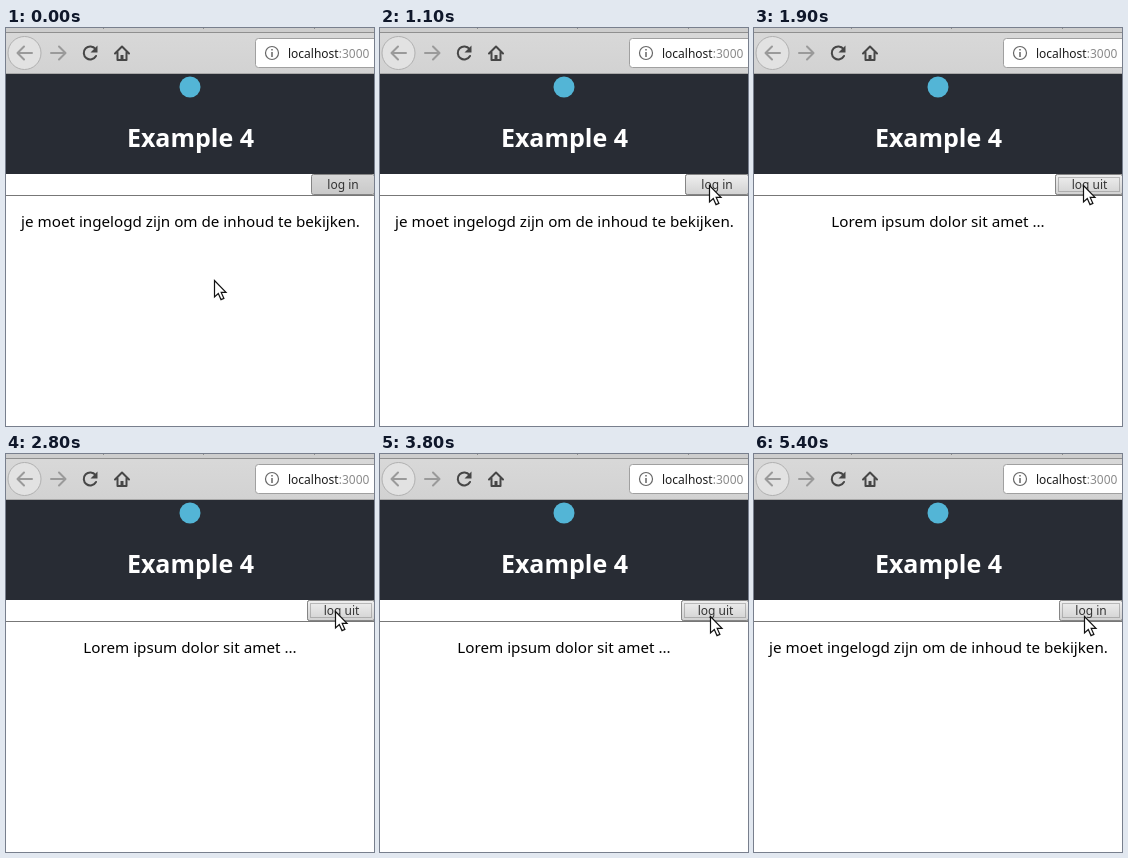
An HTML page for the animation above (5500 ms loop, 368 px wide and 398 px high).

```html
<!DOCTYPE html>
<html lang="nl">
<head>
<meta charset="utf-8">
<title>Example 4</title>
<style>
  html, body { margin: 0; width: 100%; height: 100%; overflow: hidden; background: #fff; }
  svg { display: block; width: 368px; height: 398px; font-family: "Noto Sans", "Open Sans", sans-serif; }
  .small { font-size: 12px; }
  .body { font-size: 15.2px; }
  .title { font-size: 25px; font-weight: 700; }
  .mid { text-anchor: middle; }
  .icon { fill: none; stroke: #464646; stroke-width: 2; stroke-linecap: round; stroke-linejoin: round; }
  .icon.off { stroke: #9a9a9a; }
  .edge { fill: url(#idle); stroke: #858585; }
  .hover { fill: url(#lit); stroke: #858585; }
  .ring { fill: none; stroke: #858585; stroke-dasharray: 1 1; }

  .pointer, .in, .out, .hover, .ring { animation: 5.5s step-end infinite; }
  .pointer { animation-name: move; }
  .in { animation-name: logged-out; }
  .out { animation-name: logged-in; }
  .hover { animation-name: hover; }
  .ring { animation-name: focus; }

  @keyframes move {
    0% { transform: translate(208px, 252px); }
    3.63% { transform: translate(217px, 245px); }
    5.45% { transform: translate(247px, 221px); }
    7.27% { transform: translate(289px, 187px); }
    9.09% { transform: translate(320px, 163px); }
    10.9% { transform: translate(329px, 157px); }
    52.72% { transform: translate(329px, 162px); }
    54.54% { transform: translate(330px, 169px); }
    56.36% { transform: translate(330px, 172px); }
    58.18% { transform: translate(330px, 174px); }
    60% { transform: translate(330px, 173px); }
    61.81% { transform: translate(330px, 166px); }
    63.63%, 100% { transform: translate(330px, 162px); }
  }
  @keyframes logged-out {
    0% { opacity: 1; }
    27.27% { opacity: 0; }
    74.54%, 100% { opacity: 1; }
  }
  @keyframes logged-in {
    0% { opacity: 0; }
    27.27% { opacity: 1; }
    74.54%, 100% { opacity: 0; }
  }
  @keyframes hover {
    0% { opacity: 0; }
    9.09% { opacity: 1; }
    54.54% { opacity: 0; }
    61.81%, 100% { opacity: 1; }
  }
  @keyframes focus {
    0% { opacity: 0; }
    27.27%, 100% { opacity: 1; }
  }
</style>
</head>
<body>
<svg viewBox="0 0 368 398">
  <defs>
    <linearGradient id="bar" x2="0" y2="1">
      <stop stop-color="#d9d9d9"/><stop offset="1" stop-color="#d2d2d2"/>
    </linearGradient>
    <linearGradient id="idle" x2="0" y2="1">
      <stop stop-color="#d8d8d8"/><stop offset="1" stop-color="#c9c9c9"/>
    </linearGradient>
    <linearGradient id="lit" x2="0" y2="1">
      <stop stop-color="#efefef"/><stop offset="1" stop-color="#d2d2d2"/>
    </linearGradient>
  </defs>

  <!-- browser bar -->
  <rect width="368" height="46" fill="url(#bar)"/>
  <rect width="368" height="4" fill="#cdcdcd"/>
  <rect y="4" width="368" height="1" fill="#8f8f8f"/>
  <path d="M97.5 0v1M197.5 0v1M308.5 0v1" stroke="#8f8f8f"/>
  <rect y="45" width="368" height="1" fill="#a9a9a9"/>
  <circle cx="18.5" cy="25" r="16.5" fill="#e2e2e2" stroke="#b0b0b0"/>
  <path class="icon off" d="M12 25H26M18 18.5L11.5 25L18 31.5"/>
  <path class="icon off" d="M45 25H59M53 18.5L59.5 25L53 31.5"/>
  <path class="icon" d="M89.5 21A6.5 6.5 0 1 0 90 28"/>
  <path d="M91.5 17.5V24.5H84.5Z" fill="#464646"/>
  <path class="icon" d="M109 25.5L116 18.5L123 25.5M111.5 24.5V32H120.5V24.5"/>
  <path d="M114.5 27h3v5h-3z" fill="#464646"/>
  <rect x="249.5" y="10.5" width="130" height="29" rx="3" fill="#fff" stroke="#a0a0a0"/>
  <circle cx="266" cy="25" r="6.5" fill="none" stroke="#666" stroke-width="1.2"/>
  <path d="M266 24v5M266 21v1.6" stroke="#666" stroke-width="1.5"/>
  <text class="small" x="282" y="30" fill="#1c1c1c">localhost<tspan fill="#8b8b8b">:3000</tspan></text>

  <!-- page -->
  <rect y="46" width="368" height="100" fill="#282c34"/>
  <circle cx="184" cy="59" r="10.5" fill="#53b5d6"/>
  <text class="title mid" x="184.5" y="119" fill="#fff">Example 4</text>
  <rect y="167" width="368" height="1" fill="#777"/>

  <g class="in">
    <rect class="edge" x="305.5" y="146.5" width="63" height="20" rx="2"/>
    <rect class="hover" x="305.5" y="146.5" width="63" height="20" rx="2"/>
    <rect class="ring" x="308.5" y="149.5" width="57" height="14"/>
    <text class="small mid" x="337" y="161" fill="#333">log in</text>
    <text class="body mid" x="184.5" y="199">je moet ingelogd zijn om de inhoud te bekijken.</text>
  </g>
  <g class="out">
    <rect class="edge" x="301.5" y="146.5" width="67" height="20" rx="2"/>
    <rect class="hover" x="301.5" y="146.5" width="67" height="20" rx="2"/>
    <rect class="ring" x="304.5" y="149.5" width="61" height="14"/>
    <text class="small mid" x="335.5" y="161" fill="#333">log uit</text>
    <text class="body mid" x="184" y="199">Lorem ipsum dolor sit amet ...</text>
  </g>

  <path class="pointer" d="M.5 .5V17L4.3 13.6L7 19.6L9.9 18.4L7.2 12.4H12Z" fill="#fff" stroke="#111" stroke-width="1.2"/>
</svg>
</body>
</html>
```
